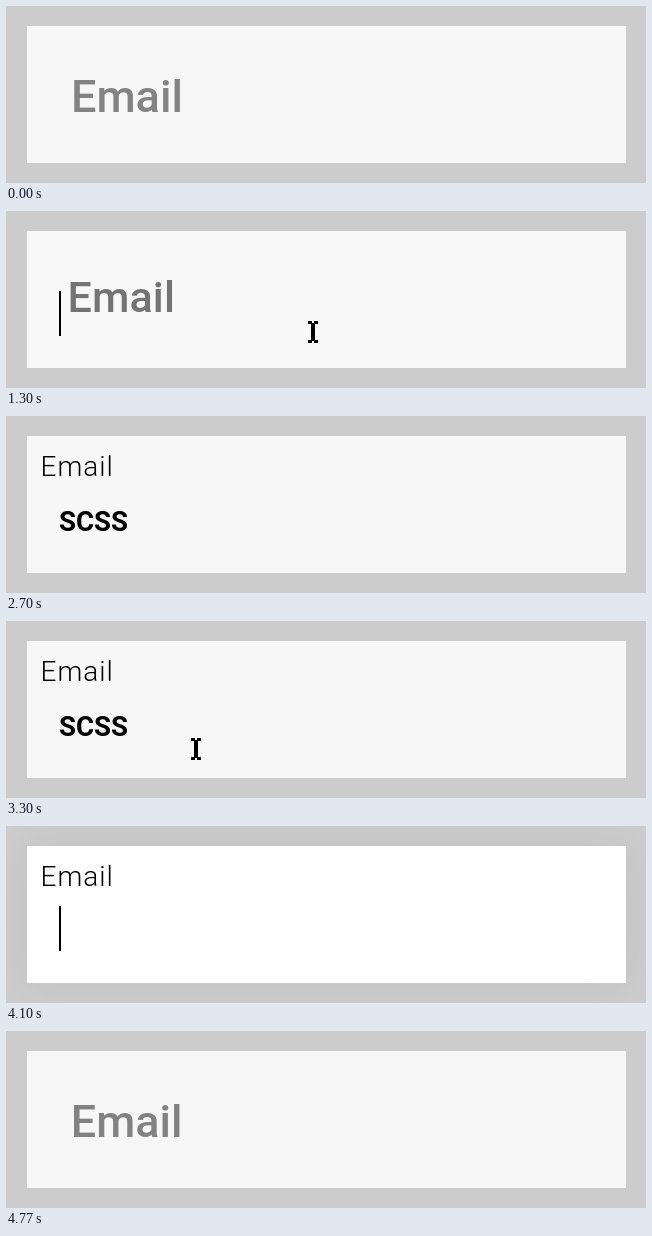
Recreate the animation shown at these times as an HTML page with a canvas. Size 640 px wide and 177 px high, loop 5.96 s.

```html
<!DOCTYPE html>
<html lang="en">
<head>
<meta charset="utf-8">
<title>Floating label field</title>
<style>
  html, body { margin: 0; width: 100%; height: 100%; overflow: hidden; background: #ccc; }
  canvas { display: block; }
</style>
</head>
<body>
<canvas id="stage" width="640" height="177"></canvas>
<script>
const ctx = document.getElementById('stage').getContext('2d', { alpha: false });
const LOOP = 5960;
const FIELD = [21, 20, 599, 137];
const TEXT = { x: 53, baseline: 115, font: '700 27.6px Roboto, sans-serif' };
const LINE = { top: 80, height: 45 };
const KEY_TIMES = [1690, 1825, 1995, 2195];
const DELETE_AT = 4095;

// Keyframes: [time, x, y] of the pointer centre
const POINTER_PATHS = [
  [[830, 334, 168], [900, 318, 138], [1000, 307, 121], [1333, 307, 121], [1433, 302, 140], [1566, 290, 190]],
  [[3195, 253, 151], [3300, 190, 128], [3400, 140, 121], [3470, 128, 121], [3600, 58, 121], [3690, 31, 121]]
];

const mix = (a, b, p) => a + (b - a) * p;
const clamp = v => Math.min(1, Math.max(0, v));
const grey = v => `rgb(${[v, v, v].map(Math.round)})`;

// CSS "ease": cubic-bezier(.25, .1, .25, 1)
function ease(x) {
  if (x <= 0 || x >= 1) return clamp(x);
  const bezier = (u, a, b) => 3 * u * (1 - u) ** 2 * a + 3 * u * u * (1 - u) * b + u ** 3;
  let low = 0, high = 1;
  for (let i = 0; i < 20; i++) {
    const mid = (low + high) / 2;
    if (bezier(mid, .25, .25) < x) low = mid; else high = mid;
  }
  return bezier(low, .1, 1);
}

const ramp = (t, start) => ease((t - start) / 300);
const focusAt = t => ramp(t, 1266) - ramp(t, 2367) + ramp(t, 3450) - ramp(t, 4500);
const floatAt = t => ramp(t, 1266) - ramp(t, 4500);
const typedAt = t => t >= DELETE_AT ? '' : 'SCSS'.slice(0, KEY_TIMES.filter(k => t >= k).length);

function selectedAt(t) {
  if (t < 3590 || t >= DELETE_AT) return 0;
  return Math.min(4, 1 + Math.floor((t - 3590) / 33));
}

function drawField(focus) {
  ctx.fillStyle = '#ccc';
  ctx.fillRect(0, 0, 640, 177);
  ctx.save();
  ctx.shadowColor = `rgba(0, 0, 0, ${.06 * focus})`;
  ctx.shadowBlur = 50;
  ctx.fillStyle = grey(mix(247, 255, focus));
  ctx.fillRect(...FIELD);
  ctx.restore();
}

function drawLabel(p) {
  const weight = Math.round(mix(5, 3, p)) * 100;
  ctx.font = `${weight} ${mix(45, 28, p)}px Roboto, sans-serif`;
  ctx.letterSpacing = `${p}px`;
  ctx.fillStyle = grey(mix(131, 0, p));
  ctx.fillText('Email', mix(65, 34.5, p), mix(106, 60, p));
  ctx.letterSpacing = '0px';
}

function drawInput(t) {
  const text = typedAt(t);
  const selected = selectedAt(t);
  ctx.font = TEXT.font;
  const end = TEXT.x + ctx.measureText(text).width;
  ctx.fillStyle = '#000';
  ctx.fillText(text, TEXT.x, TEXT.baseline);

  if (selected) {
    const start = Math.round(TEXT.x + ctx.measureText(text.slice(0, 4 - selected)).width);
    ctx.save();
    ctx.beginPath();
    ctx.rect(start, LINE.top, Math.round(end) - start, LINE.height);
    ctx.clip();
    ctx.fillStyle = '#0078d7';
    ctx.fillRect(0, LINE.top, 640, LINE.height);
    ctx.fillStyle = '#fff';
    ctx.fillText(text, TEXT.x, TEXT.baseline);
    ctx.restore();
  }

  const caretOn = (t >= 1295 && t < 2395) || (t >= DELETE_AT && t < 4525);
  if (caretOn) {
    ctx.fillStyle = '#000';
    ctx.fillRect(Math.round(end), LINE.top, 2, LINE.height);
  }
}

function drawPointer(t) {
  const path = POINTER_PATHS.find(p => t >= p[0][0] && t < p[p.length - 1][0]);
  if (!path) return;
  const i = path.findIndex(k => t < k[0]);
  const [t0, x0, y0] = path[i - 1], [t1, x1, y1] = path[i];
  const p = (t - t0) / (t1 - t0);
  const x = Math.round(mix(x0, x1, p)), y = Math.round(mix(y0, y1, p));
  ctx.fillStyle = '#000';
  ctx.fillRect(x - 2, y - 9, 4, 18);
  for (const top of [y - 11, y + 8]) {
    ctx.fillRect(x - 5, top, 4, 3);
    ctx.fillRect(x + 1, top, 4, 3);
  }
}

function draw(now) {
  // The motion runs at 30 steps a second
  const t = Math.floor((now % LOOP + 7) * .03) / .03;
  drawField(focusAt(t));
  drawLabel(floatAt(t));
  drawInput(t);
  drawPointer(t);
}

const begin = performance.now();
function tick() {
  draw(performance.now() - begin);
  requestAnimationFrame(tick);
}
tick();
</script>
</body>
</html>
```
